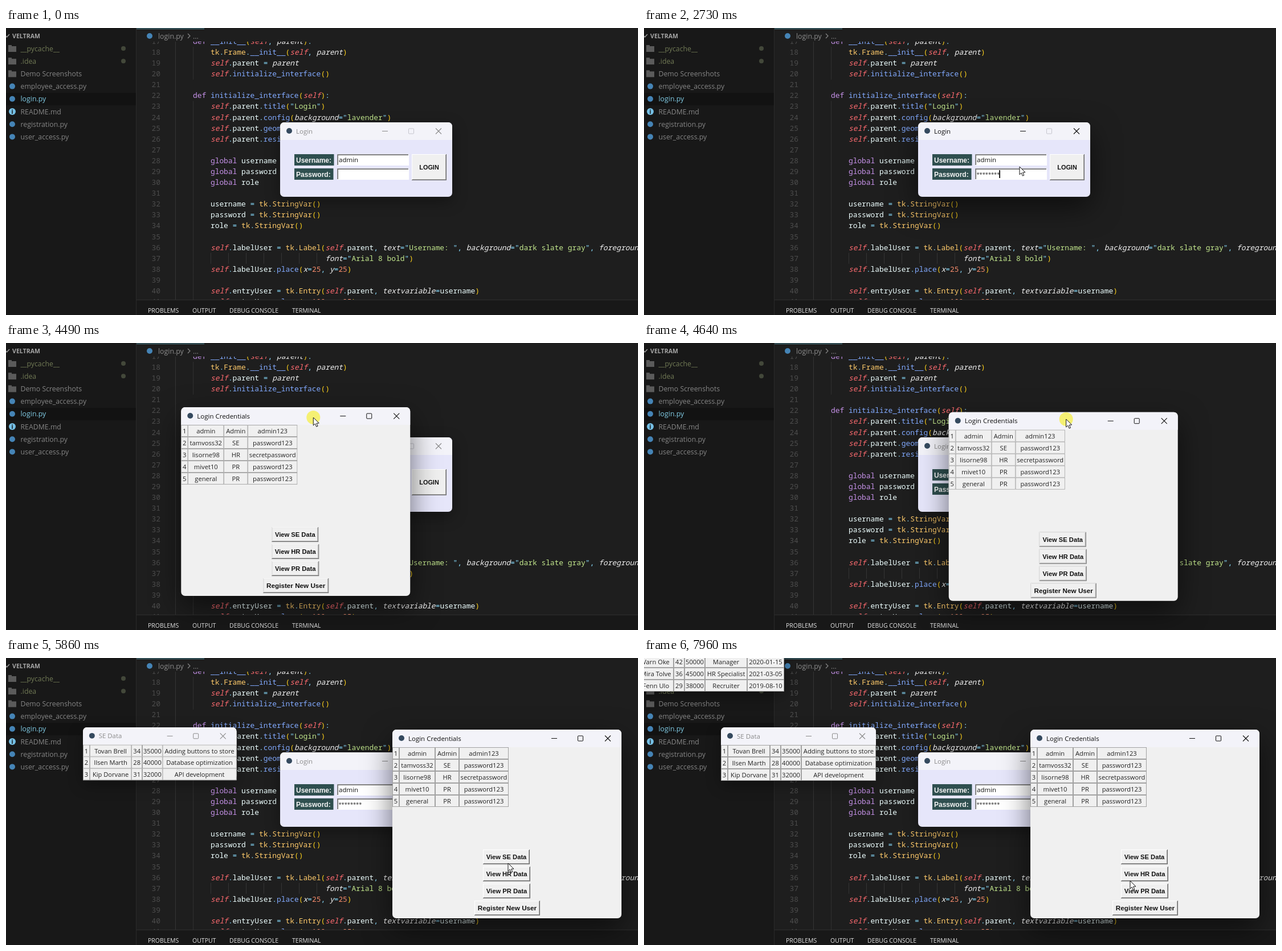
An HTML page with a canvas that plays this animation: 1109 by 505 pixels, repeating every 7990 ms.

```html
<!DOCTYPE html>
<html lang="en">
<head>
<meta charset="utf-8">
<title>Login demo</title>
<style>
  html, body { margin: 0; width: 100%; height: 100%; overflow: hidden; background: #1e1e1e; }
  canvas { display: block; }
</style>
</head>
<body>
<canvas id="stage" width="1109" height="505"></canvas>
<script>
const ctx = document.getElementById('stage').getContext('2d');
const W = 1109, H = 505, LOOP = 7990;
const UI = '"Open Sans", "Noto Sans", sans-serif';
const BOLD = '"Liberation Sans", Arial, sans-serif';
const MONO = '"Noto Sans Mono", "DejaVu Sans Mono", monospace';

// ---------- helpers ----------
const clamp = v => Math.max(0, Math.min(1, v));
const ramp = (t, start, len) => clamp((t - start) / len);
const easeOut = p => 1 - (1 - p) ** 3;

function rect(x, y, w, h, color) {
  ctx.fillStyle = color;
  ctx.fillRect(x, y, w, h);
}

function disc(x, y, r, color) {
  ctx.fillStyle = color;
  ctx.beginPath();
  ctx.arc(x, y, r, 0, Math.PI * 2);
  ctx.fill();
}

function line(color, width, ...pts) {
  ctx.strokeStyle = color;
  ctx.lineWidth = width;
  ctx.beginPath();
  pts.forEach(([x, y], i) => i ? ctx.lineTo(x, y) : ctx.moveTo(x, y));
  ctx.stroke();
}

function text(str, x, y, color, font, align = 'left') {
  ctx.font = font;
  ctx.fillStyle = color;
  ctx.textAlign = align;
  ctx.fillText(str, x, y);
}

function gray(from, to, p) {
  const v = Math.round(from + (to - from) * p);
  return `rgb(${v},${v},${v})`;
}

// Smooth path through [time, x, y] keys; a hold gives zero speed.
function follow(keys, t) {
  const last = keys.length - 1;
  if (t <= keys[0][0]) return keys[0].slice(1);
  if (t >= keys[last][0]) return keys[last].slice(1);
  let i = 0;
  while (keys[i + 1][0] < t) i++;
  const slope = (j, k) => (keys[j + 1][k] - keys[j][k]) / (keys[j + 1][0] - keys[j][0]);
  const tangent = (j, k) => {
    if (j === 0 || j === last) return 0;
    const a = slope(j - 1, k), b = slope(j, k);
    return a * b <= 0 ? 0 : 2 * a * b / (a + b);
  };
  const span = keys[i + 1][0] - keys[i][0];
  const u = (t - keys[i][0]) / span;
  return [1, 2].map(k =>
    keys[i][k] * (1 + 2 * u) * (1 - u) ** 2 + keys[i + 1][k] * u * u * (3 - 2 * u) +
    span * (tangent(i, k) * u * (1 - u) ** 2 + tangent(i + 1, k) * u * u * (u - 1)));
}

// ---------- timeline ----------
const pointer = [
  [30, 972, 474], [420, 800, 330], [760, 659, 244], [2760, 659, 244],
  [2930, 742, 247], [3240, 742, 247], [3330, 679, 236], [3630, 299, 179],
  [3980, 266, 104], [4330, 266, 104], [4490, 538, 131], [4780, 836, 135],
  [5110, 836, 135], [5450, 879, 350], [5700, 879, 350], [5860, 881, 361],
  [6120, 878, 381], [6700, 878, 381], [6800, 872, 402], [7310, 324, 52],
  [7480, 324, 52], [7580, 167, 17], [7880, 851, 411], [7960, 853, 392]
];
const drag = [[4340, 108, 95], [4490, 306, 113], [4800, 678, 126]];
const presses = [[800, 880], [2950, 3030], [4310, 4920], [5500, 5580], [6180, 6260]];
const keyTimes = [1300, 1420, 1680, 1780, 1930, 2100, 2300, 2510];
const pressed = (t, i) => t >= presses[i][0] && t < presses[i][1];

// ---------- editor ----------
const PITCH = 7.74, CODE_X = 297, ROW = 19.09;
const B = '        ';
const code = [
  '    def __init__(self, parent):',
  B + 'tk.Frame.__init__(self, parent)',
  B + 'self.parent = parent',
  B + 'self.initialize_interface()',
  '',
  '    def initialize_interface(self):',
  B + 'self.parent.title("Login")',
  B + 'self.parent.config(background="lavender")',
  B + 'self.parent.geometry("300x100")',
  B + 'self.parent.resizable(0, 0)',
  '',
  B + 'global username',
  B + 'global password',
  B + 'global role',
  '',
  B + 'username = tk.StringVar()',
  B + 'password = tk.StringVar()',
  B + 'role = tk.StringVar()',
  '',
  B + 'self.labelUser = tk.Label(self.parent, text="Username: ", background="dark slate gray", foreground="white",',
  ' '.repeat(34) + 'font="Arial 8 bold")',
  B + 'self.labelUser.place(x=25, y=25)',
  '',
  B + 'self.entryUser = tk.Entry(self.parent, textvariable=username)',
  B + 'self.entryUser.place(x=100, y=25)'
];

function tokenStyle(tok, before, after) {
  if (/^[()]$/.test(tok)) return ['#ffd21c'];
  if (/^[.,=:]$/.test(tok)) return ['#89ddff'];
  if (/^\d/.test(tok)) return ['#f78c6c'];
  if (/^(def|global)$/.test(tok)) return ['#c792ea'];
  if (tok === 'self') return ['#ff6b70', true];
  if (tok === 'tk' || /tk\.$/.test(before)) return ['#ffcb6b'];
  if (after[0] === '(') return ['#82aaff'];
  if (after[0] === '=' || (tok === 'parent' && !/\.$/.test(before))) return ['#f2f2f2', true];
  return ['#eeffff'];
}

function drawCodeLine(src, y) {
  for (const m of src.matchAll(/"[^"]*"|\w+|[^\w\s]/g)) {
    const tok = m[0], x = CODE_X + m.index * PITCH;
    if (tok[0] === '"') {
      const font = `12.9px ${MONO}`;
      text('"', x, y, '#89ddff', font);
      text(tok.slice(1, -1), x + PITCH, y, '#c3e88d', font);
      text('"', x + (tok.length - 1) * PITCH, y, '#89ddff', font);
    } else {
      const [color, italic] = tokenStyle(tok, src.slice(0, m.index), src.slice(m.index + tok.length));
      text(tok, x, y, color, `${italic ? 'italic ' : ''}12.9px ${MONO}`);
    }
  }
}

function drawCode() {
  ctx.save();
  ctx.beginPath();
  ctx.rect(229, 24, W - 229, 454);
  ctx.clip();
  rect(297, 24, 1, 454, '#343434');
  code.forEach((src, i) => {
    const y = 47 + (i - 1) * ROW, top = y - 14;
    if ((i >= 1 && i <= 3) || i >= 6) rect(328, top, 1, ROW + 0.5, '#303030');
    if (i === 20) for (let k = 0; k < 7; k++) rect(359 + k * 31, top, 1, ROW, '#343434');
    text(String(17 + i), 271, y, '#4c4c4c', `12.9px ${MONO}`, 'right');
    drawCodeLine(src, y);
  });
  ctx.restore();
}

function drawFolder(y) {
  rect(4, y - 6, 6, 3, '#5b5b5b');
  rect(4, y - 4, 14, 10, '#5b5b5b');
}

function drawSidebar() {
  rect(0, 0, 228, H, '#181818');
  rect(228, 0, 1, H, '#2a2a2a');
  line('#aaa', 1.2, [-2, 12], [1.5, 16], [6, 11]);
  text('VELTRAM', 11, 18, '#a5a5a5', `bold 10.6px ${UI}`);
  rect(0, 114, 228, 22, '#121212');
  const names = ['__pycache__', '.idea', 'Demo Screenshots', 'employee_access.py',
    'login.py', 'README.md', 'registration.py', 'user_access.py'];
  names.forEach((name, i) => {
    const y = 36 + i * 22.2;
    if (i < 3) drawFolder(y);
    else disc(11, y, i === 5 ? 6 : 5, i === 5 ? '#75bfe5' : '#4584b6');
    if (i === 5) text('i', 11, y + 4, '#181818', `bold 10px ${UI}`, 'center');
    if (i < 2) disc(206, y, 4, '#43483a');
    const color = i < 2 ? '#717a55' : i === 4 ? '#80cbe4' : '#858585';
    text(name, 25.5, y + 4.5, color, `12.3px ${UI}`);
  });
}

function drawEditor() {
  rect(0, 0, W, H, '#1e1e1e');
  drawSidebar();
  rect(229, 1, 119, 1, '#4f8796');
  disc(252, 14, 5, '#4584b6');
  text('login.py', 267, 18.5, '#8c8c8c', `12.3px ${UI}`);
  line('#8c8c8c', 1.1, [319, 10], [323, 14], [319, 18]);
  text('...', 328, 18.5, '#8c8c8c', `12.3px ${UI}`);
  drawCode();
  rect(229, 478, W - 229, 27, '#181818');
  rect(229, 478, W - 229, 1, '#2e2e2e');
  [['PROBLEMS', 249], ['OUTPUT', 327], ['DEBUG CONSOLE', 392], ['TERMINAL', 502]]
    .forEach(([s, x]) => text(s, x, 501, '#e4e4e4', `10.5px ${UI}`));
}

// ---------- windows ----------
function drawFrame(w, h, title, active, body, fixed) {
  ctx.save();
  ctx.shadowColor = `rgba(0,0,0,${0.35 + 0.2 * active})`;
  ctx.shadowBlur = 26 + 24 * active;
  ctx.shadowOffsetY = 8 + 10 * active;
  ctx.fillStyle = body;
  ctx.beginPath();
  ctx.roundRect(0, 0, w, h, 7);
  ctx.fill();
  ctx.restore();
  ctx.fillStyle = '#f3f3f9';
  ctx.beginPath();
  ctx.roundRect(0, 0, w, 31, [7, 7, 0, 0]);
  ctx.fill();

  const ink = gray(138, 15, active);
  disc(16, 15, 5, '#34495e');
  text(title, 28, 19.5, ink, `11.5px ${UI}`);
  line(ink, 1, [w - 123, 15.5], [w - 113, 15.5]);
  ctx.strokeStyle = fixed ? '#c6c6ce' : ink;
  ctx.beginPath();
  ctx.roundRect(w - 76.5, 11, 9, 9, 1);
  ctx.stroke();
  line(ink, 1.1, [w - 29, 10.5], [w - 19, 20.5]);
  line(ink, 1.1, [w - 29, 20.5], [w - 19, 10.5]);
}

function drawButton(label, x, y, w, h, size, down) {
  rect(x, y, w, h, down ? '#fff' : '#696969');
  rect(x, y, w - 1, h - 1, down ? '#696969' : '#fff');
  rect(x + 1, y + 1, w - 2, h - 2, down ? '#f0f0f0' : '#a0a0a0');
  rect(x + 1, y + 1, w - 3, h - 3, '#f0f0f0');
  const d = down ? 1 : 0;
  text(label, x + w / 2 + d, y + h / 2 + 4 + d, '#111', `bold ${size}px ${BOLD}`, 'center');
}

function drawTable(edges, rows) {
  rows.forEach((row, r) => row.split('|').forEach((cell, c) => {
    const x = edges[c], y = 31 + r * 21, w = edges[c + 1] - x;
    rect(x, y, w, 21, '#fafafa');
    ctx.strokeStyle = '#a2a2a2';
    ctx.lineWidth = 1;
    ctx.strokeRect(x + 0.5, y + 0.5, w - 1, 20);
    rect(x + 1, y + 1, w - 2, 19, '#f0f0f0');
    text(cell, x + w / 2, y + 15, '#222', `11.2px ${UI}`, 'center');
  }));
}

function drawEntry(y) {
  rect(100, y, 126, 20, '#fff');
  rect(100, y, 125, 19, '#9a9a9a');
  rect(101, y + 1, 124, 18, '#6c6c6c');
  rect(102, y + 2, 123, 17, '#fff');
}

function drawLogin(t) {
  const active = ramp(t, 810, 120) * (1 - ramp(t, 4330, 120));
  drawFrame(302, 131, 'Login', active, '#e6e6fa', true);
  [['Username:', 56, 69.5], ['Password:', 81, 68.5]].forEach(([s, y, w]) => {
    rect(25, y, w, 20, '#2f4f4f');
    text(s, 28, y + 14.5, '#f4f4f4', `bold 12px ${BOLD}`);
    drawEntry(y);
  });
  text('admin', 103, 70, '#111', `11.5px ${UI}`);
  const typed = keyTimes.filter(k => t >= k).length;
  for (let i = 0; i < typed; i++) text('*', 102.5 + i * 5.1, 95, '#222', `9.4px ${UI}`);
  if (t >= 890 && t < 4330) rect(101.5 + typed * 5.1, 84, 1.7, 14, '#000');
  drawButton('LOGIN', 231, 56, 61, 46, 10.9, pressed(t, 1));
}

function drawCredentials(t) {
  drawFrame(402, 332, 'Login Credentials', ramp(t, 4320, 100), '#f0f0f0');
  drawTable([0, 12, 75, 117, 204], [
    '1|admin|Admin|admin123',
    '2|tamvoss32|SE|password123',
    '3|lisorne98|HR|secretpassword',
    '4|mivet10|PR|password123',
    '5|general|PR|password123'
  ]);
  drawButton('View SE Data', 159, 211, 82, 26, 11.2, pressed(t, 3));
  drawButton('View HR Data', 159, 241, 83, 26, 11.2, pressed(t, 4));
  drawButton('View PR Data', 159, 271, 83, 26, 11.2);
  drawButton('Register New User', 144, 301, 115, 26, 11.7);
}

function drawSE() {
  drawFrame(272, 93, 'SE Data', 0, '#f0f0f0');
  drawTable([0, 12, 86, 105, 141, 272], [
    '1|Tovan Brell|34|35000|Adding buttons to store',
    '2|Ilsen Marth|28|40000|Database optimization',
    '3|Kip Dorvane|31|32000|API development'
  ]);
}

function drawHR() {
  drawFrame(268, 93, 'HR Data', 0, '#f0f0f0');
  drawTable([0, 12, 74, 93, 129, 203, 268], [
    '1|Varn Oke|42|50000|Manager|2020-01-15',
    '2|Mira Tolve|36|45000|HR Specialist|2021-03-05',
    '3|Fenn Ulo|29|38000|Recruiter|2019-08-10'
  ]);
}

// Places a window and plays its short grow-and-fade when it opens.
function show(t, opened, [x, y], draw) {
  const p = easeOut(ramp(t, opened, 220));
  if (p <= 0) return;
  const s = 0.9 + 0.1 * p;
  ctx.save();
  ctx.translate(x, y);
  ctx.scale(s, s);
  ctx.globalAlpha = clamp(p * 1.3);
  draw(t);
  ctx.restore();
}

// ---------- pointer ----------
function drawPointer(t) {
  if (t < 30) return;
  const [x, y] = follow(pointer, t);
  for (const [down, up] of presses) {
    const glow = ramp(t, down - 20, 60) * (1 - ramp(t, up, 140));
    if (glow <= 0) continue;
    ctx.globalAlpha = 0.85 * glow;
    disc(x, y, 12, '#f5ee5c');
    ctx.globalAlpha = 1;
  }
  const shape = [[0, 0], [0, 14], [3.2, 11], [5.4, 16.2], [7.8, 15.2], [5.6, 10.2], [10, 10]];
  ctx.beginPath();
  shape.forEach(([dx, dy]) => ctx.lineTo(x + dx, y + dy));
  ctx.closePath();
  ctx.fillStyle = '#fff';
  ctx.fill();
  ctx.strokeStyle = '#111';
  ctx.lineWidth = 1;
  ctx.stroke();
}

function render(t) {
  drawEditor();
  show(t, -1000, [481, 166], drawLogin);
  show(t, 3050, follow(drag, t), drawCredentials);
  show(t, 5740, [135, 122], drawSE);
  show(t, 6460, [-22, -35], drawHR);
  drawPointer(t);
}

const start = performance.now();
function tick() {
  render((performance.now() - start) % LOOP);
  requestAnimationFrame(tick);
}
tick();
</script>
</body>
</html>
```
